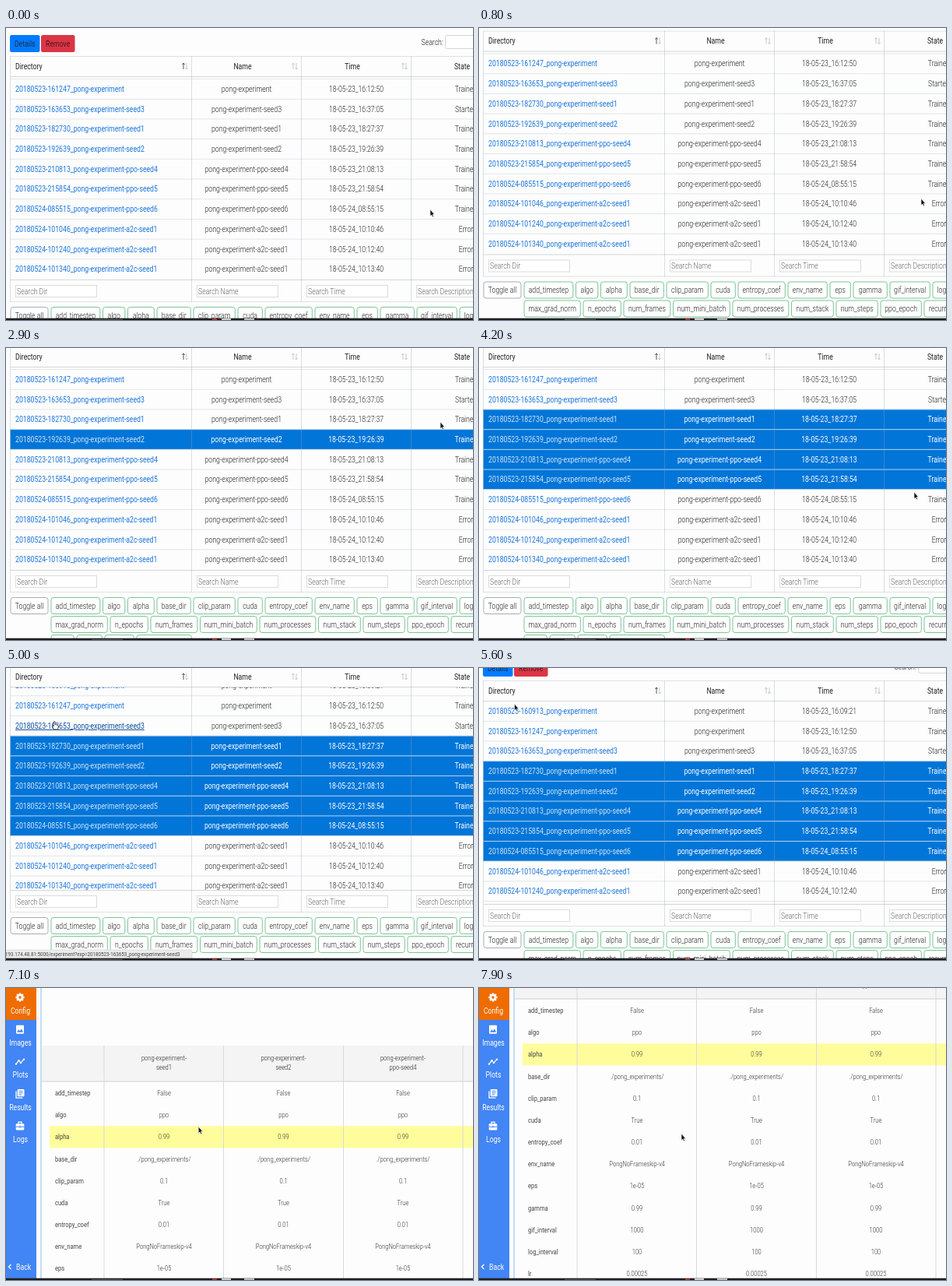
These frames come from a looping animation (600 px wide and 375 px high, 8000 ms). An HTML page:

```html
<!DOCTYPE html>
<html lang="en">
<head>
<meta charset="utf-8">
<title>Experiment table</title>
<style>
html, body { margin: 0; width: 100%; height: 100%; overflow: hidden; background: #fdfdfd; }
#stage { display: block; width: 600px; height: 375px; font-family: Roboto, "Liberation Sans", sans-serif; }
</style>
</head>
<body>
<svg id="stage" viewBox="0 0 600 375"></svg>
<script>
const LOOP = 8000, STEP = 100, PITCH = 25.7;
const stage = document.getElementById('stage');

// Drawing helpers.
const text = (s, x, y, {size = 10, fill = '#222', weight = 300, anchor = 'start', more = ''} = {}) =>
  `<text transform="translate(${x} ${y + size * .35}) scale(.87 1)" font-size="${size}" fill="${fill}" font-weight="${weight}" text-anchor="${anchor}" ${more}>${s}</text>`;
const mid = (s, x, y, o) => text(s, x, y, {anchor: 'middle', ...o});
const rect = (x, y, w, h, fill, more = '') =>
  `<rect x="${x}" y="${y}" width="${w}" height="${h}" fill="${fill}" ${more}/>`;
const box = (x, y, w, h, stroke, r = 0) => rect(x, y, w, h, '#fff', `stroke="${stroke}" rx="${r}"`);
const path = (d, more) => `<path d="${d}" ${more}/>`;
const hline = (y, c = '#dee2e6', x = 5.5) => path(`M${x} ${y}H600`, `stroke="${c}"`);
const vline = (x, y1, y2, c) => path(`M${x} ${y1}V${y2}`, `stroke="${c}"`);
const move = (x, y, s) => `<g transform="translate(${x} ${y})">${s}</g>`;

// Eased interpolation through [time, x, y] points.
function along(keys, t) {
  let i = keys.findIndex(k => k[0] > t);
  if (i < 0) return keys[keys.length - 1].slice(1);
  if (i === 0) return keys[0].slice(1);
  const a = keys[i - 1], b = keys[i], u = (t - a[0]) / (b[0] - a[0]), e = u * u * (3 - 2 * u);
  return a.slice(1).map((v, j) => v + (b[j + 1] - v) * e);
}

const runs = `20180523-160913_pong-experiment 16:09:21 Trained
20180523-161247_pong-experiment 16:12:50 Trained
20180523-163653_pong-experiment-seed3 16:37:05 Started
20180523-182730_pong-experiment-seed1 18:27:37 Trained
20180523-192639_pong-experiment-seed2 19:26:39 Trained
20180523-210813_pong-experiment-ppo-seed4 21:08:13 Trained
20180523-215854_pong-experiment-ppo-seed5 21:58:54 Trained
20180524-085515_pong-experiment-ppo-seed6 08:55:15 Trained
20180524-101046_pong-experiment-a2c-seed1 10:10:46 Error
20180524-101240_pong-experiment-a2c-seed1 10:12:40 Error
20180524-101340_pong-experiment-a2c-seed1 10:13:40 Error`.split('\n').map(r => {
  const [dir, time, state] = r.split(' ');
  return {dir, state, name: dir.slice(16), time: `18-05-${dir.slice(6, 8)}_${time}`};
});
const picks = {4: 2500, 3: 3100, 5: 3500, 6: 3900, 7: 4300};
const HOVER = 2;

const cursorPath = [[0, 545, 233], [800, 568, 219], [1800, 565, 150], [2500, 558, 115], [2900, 558, 95],
  [3200, 558, 92], [3600, 558, 142], [3900, 559, 167], [4200, 559, 185], [4400, 559, 189], [4900, 62, 69],
  [5300, 62, 69], [5900, 29, 23], [6500, 29, 23], [7200, 260, 187]];

const buttonRows = [
  [['add_timestep', 'algo', 'alpha', 'base_dir', 'clip_param', 'cuda', 'entropy_coef', 'env_name', 'eps', 'gamma', 'gif_interval', 'log_interval'],
   [58, 124.5, 156.5, 194, 241, 298, 333, 397, 451, 481, 528, 583, 641]],
  [['max_grad_norm', 'n_epochs', 'num_frames', 'num_mini_batch', 'num_processes', 'num_stack', 'num_steps', 'ppo_epoch', 'recurrent_policy'],
   [58, 134, 186, 249.5, 326, 401.5, 459, 516, 572, 648]],
  [['seed', 'tau', 'use_gae', 'value_loss_coef'], [58, 91, 127, 168, 242]]
];

function arrows(x, up) {
  const arrow = (d, c) => path(d, `fill="none" stroke="${c}" stroke-width=".9"`);
  return arrow(`M${x} 53V45M${x - 1.6} 47L${x} 45L${x + 1.6} 47`, up ? '#444' : '#c4c4c4') +
    arrow(`M${x + 4} 45V53M${x + 2.4} 51L${x + 4} 53L${x + 5.6} 51`, '#c4c4c4');
}

const linkHover = t => t >= 4900 && t < 5400;

function runRow(run, i, t) {
  const y = 12.9 + PITCH * i, on = t >= picks[i], hover = i === HOVER && linkHover(t);
  const cell = on ? {fill: '#fff', weight: 400} : {};
  return (on ? rect(5.5, y - 12.9, 595, PITCH, '#0275d8') : '') +
    hline(y - 12.85, on ? '#b4d3f0' : '#e2e5e8') +
    text(run.dir, 12, y, {
      fill: on ? '#cfe4f7' : hover ? '#0d4f9e' : '#1b75dd', weight: 400,
      more: hover ? 'text-decoration="underline"' : ''
    }) +
    mid(run.name, 309, y, cell) + mid(run.time, 450, y, cell) + mid(run.state, 591, y, cell);
}

function tablePage(t) {
  const scroll = t < 300 ? 0 : t < 1000 ? 32.5 : t < 5600 ? 38 : t < 5700 ? 20 : 0;
  const [inner] = along([[4700, 22.7], [5000, 14.5], [5300, 0]], t);
  const over = t >= 5800;
  let s = rect(5, 9, 38.5, 22, over ? '#0069d9' : '#007bff', 'rx="2.5"') +
    rect(45, 9, 43.5, 22, '#dc3545', 'rx="2.5"') +
    mid('Details', 24.2, 20, {fill: '#1b2c44', weight: 400}) +
    mid('Remove', 66.7, 20, {fill: '#4a1820', weight: 400}) +
    text('Search:', 533.5, 18) + box(564.5, 9.5, 60, 17, '#d4d4d4', 2);

  s += hline(36.5) +
    text('Directory', 12, 49, {weight: 400}) + arrows(228, true);
  ['Name', 'Time', 'State'].forEach((h, i) => {
    s += mid(h, 304 + 141 * i, 49, {weight: 400}) + arrows(369 + 141 * i);
  });

  s += `<svg y="62.5" width="600" height="261">${move(0, -inner, runs.map((r, i) => runRow(r, i, t)).join(''))}</svg>`;
  s += hline(62.5, '#d3d7db') + hline(323.5, '#d3d7db') + hline(351.5);
  [5.5, 238.5, 379.5, 520.5].forEach(x => s += vline(x, 36, 352, 'rgba(150,165,180,.35)'));
  ['Dir', 'Name', 'Time', 'Description'].forEach((n, i) => {
    const x = i ? 104.5 + 141 * i : 12.5;
    s += box(x, 330.5, 104, 15, '#dcdcdc') + text('Search ' + n, x + 1.5, 338, {fill: '#666'});
  });

  s += box(6, 358.5, 48, 21, '#a9aeb3', 3) + mid('Toggle all', 30, 369);
  buttonRows.forEach(([labels, xs], r) => labels.forEach((l, i) => {
    const w = xs[i + 1] - xs[i] - 3.7, y = 369 + 24 * r;
    s += box(xs[i], y - 10.5, w, 21, '#7cc596', 3) + mid(l, xs[i] + w / 2, y);
  }));

  s = move(0, -scroll, s);
  if (linkHover(t)) {
    s += rect(0, 362, 239, 11, '#ebebeb', 'rx="2" stroke="#d4d4d4" stroke-width=".6"') +
      text('193.174.48.81:5000/experiment?exp=' + runs[HOVER].dir, -1, 367, {size: 7.17, fill: '#444', weight: 400});
  }
  return s;
}

const params = `add_timestep False
algo ppo
alpha 0.99
base_dir ./pong_experiments/
clip_param 0.1
cuda True
entropy_coef 0.01
env_name PongNoFrameskip-v4
eps 1e-05
gamma 0.99
gif_interval 1000
log_interval 100
lr 0.00025`.split('\n').map(p => p.split(' '));

// Sidebar icons, each centred on the origin.
const W = 'fill="#fff"', L = 'fill="none" stroke="#fff" stroke-width="1.3"';
const gear = '<circle r="3" fill="none" stroke="#fff" stroke-width="2.6"/>' +
  [0, 45, 90, 135].map(a => path('M0-5.6V-3.6M0 3.6V5.6', `stroke="#fff" stroke-width="2.4" transform="rotate(${a})"`)).join('');
const menu = [
  ['Config', gear],
  ['Images', rect(-5, -5.5, 10, 11, '#fff', 'rx="1"') + path('M-4 3.5L-1.6 0L0 2L2 -1L4 3.5Z', 'fill="#4285f4"')],
  ['Plots', path('M-5 3L-1.5 -1.5L1 1.5L5 -3', L) +
    [[-5, 3], [-1.5, -1.5], [1, 1.5], [5, -3]].map(([x, y]) => `<circle cx="${x}" cy="${y}" r="1.2" ${W}/>`).join('')],
  ['Results', path('M-5 -3.5V5.3H3.5', L) + rect(-3.3, -5.8, 8.8, 9.2, '#fff', 'rx="1"') +
    path('M-1.5 -3.5H3.6M-1.5 -1.2H3.6M-1.5 1.1H2', 'stroke="#4285f4"')],
  ['Logs', rect(-5.3, -3, 10.6, 8.4, '#fff', 'rx="1"') + path('M-2 -3V-5H2V-3', L) +
    path('M-5.3 1H5.3M0 -.5V2.5', 'stroke="#4285f4"')]
];

function configPage(t) {
  const [top] = along([[7300, 106], [7900, 0]], t);
  let s = rect(46, -32, 554, 46, '#f4f4f4') + hline(14, '#cfcfcf', 46);
  params.forEach(([key, value], i) => {
    const y = 29 + 28.17 * i;
    if (key === 'alpha' && t >= 7100) s += rect(56, y - 14, 544, 28, '#fffd9b');
    s += text(key, 63, y, {size: 8.7, weight: 400, fill: '#444'});
    for (let c = 0; c < 3; c++) s += mid(value, 203 + 153.5 * c, y, {size: 8.7, fill: '#333'});
  });
  ['seed1', 'seed2', 'ppo-seed4'].forEach((n, c) => {
    s += mid('pong-experiment-', 203 + 153.5 * c, -16, {size: 8.7}) +
      mid(n, 203 + 153.5 * c, -4, {size: 8.7});
  });
  [126, 279.5, 433.5, 587].forEach(x => s += vline(x, -32, 400, '#d8dadd'));
  s = move(0, top, s) + vline(45, 0, 375, '#8dbbea');

  s += rect(0, 0, 39, 375, '#4285f4') + rect(0, 0, 39, 41, '#ef6c00');
  menu.forEach(([label, icon], i) => {
    const y = 12 + 41.3 * i;
    s += move(18, y, icon) + mid(label, 18.5, y + 17.3, {fill: '#fff', weight: 400});
  });
  return s + path('M6.5 355L3.5 358L6.5 361', L) + text('Back', 13, 358, {fill: '#fff', weight: 400});
}

function cursor(t) {
  const [x, y] = along(cursorPath, t);
  const hand = linkHover(t) || (t >= 5800 && t < 6600);
  return move(x, y, hand
    ? path('M-.8 0Q.2 -1 1.1 0V3.5L4.6 4.4Q5.6 4.8 5.4 6L4.6 10H-.3L-2.6 6.4Q-2.6 5.2 -.8 6Z', 'fill="#fff" stroke="#222" stroke-width=".8"')
    : path('M0 0V8.6L1.8 7L3 9.8L4.4 9.2L3.2 6.4H5.5Z', 'fill="#111" stroke="#fff" stroke-width=".6"'));
}

const dock = rect(0, 372.7, 600, 2.3, '#1d1d22') + rect(265, 373.4, 6, 1.6, '#c0392b') +
  rect(277, 373, 12, 2, '#ccc') + rect(306, 373, 13, 2, '#bbb') + rect(110, 374, 40, 1, '#555');

let last = -1;
function draw(now) {
  const t = Math.floor(now % LOOP / STEP) * STEP;
  if (t !== last) {
    stage.innerHTML = rect(0, 0, 600, 375, '#fdfdfd') + (t < 6600 ? tablePage(t) : configPage(t)) + dock + cursor(t);
    last = t;
  }
  requestAnimationFrame(draw);
}
draw(0);
</script>
</body>
</html>
```
